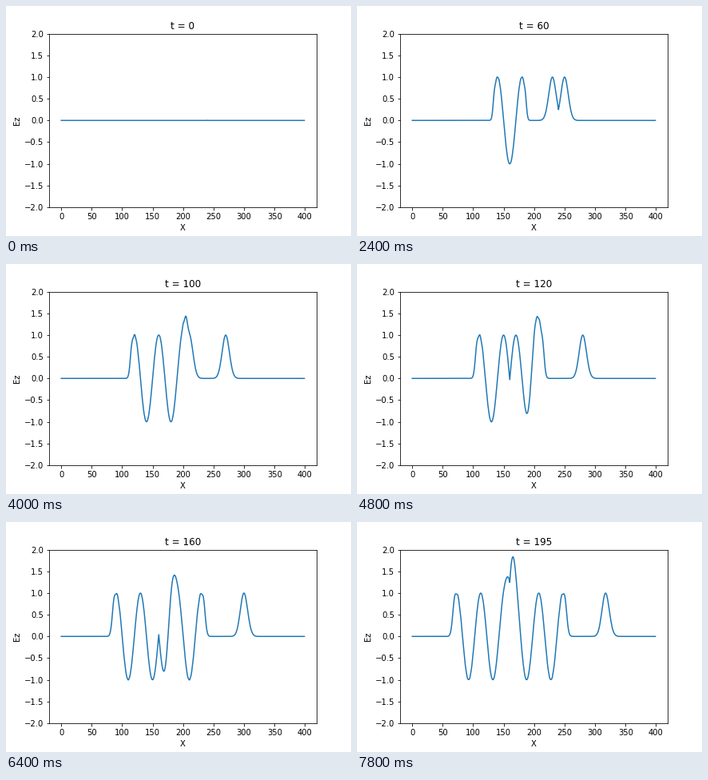
A matplotlib script that plays this animation: 432x288 px, repeating every 8000 ms.

```python
import numpy as np
import matplotlib.pyplot as plt
from matplotlib.animation import FuncAnimation

CELLS = 400
STEP = 5          # time steps per frame
FRAMES = 40
COURANT = 0.5
OMEGA = 2 * np.pi / 80 * 1.003


def sine(t):
    return np.sin(OMEGA * t)


def pulse(t):
    return np.exp(-0.5 * ((t - 40) / 12) ** 2)


def simulate(source, pos):
    """1D FDTD field driven by a hard source, sampled once per frame."""
    ez, hy = np.zeros(CELLS), np.zeros(CELLS)
    fields = []
    for t in range(STEP * FRAMES):
        ez[1:] += COURANT * (hy[:-1] - hy[1:])
        ez[pos] = source(t)
        hy[:-1] += COURANT * (ez[:-1] - ez[1:])
        if t % STEP == 0:
            fields.append(ez.copy())
    return np.array(fields)


# The waves pass through each other freely, so the two runs simply add up.
field = simulate(sine, 160) + simulate(pulse, 240)

fig, ax = plt.subplots(figsize=(6, 4), dpi=72, facecolor="white")
fig.subplots_adjust(left=0.125, right=0.9, bottom=0.125, top=0.88)
line, = ax.plot(field[0], color="#1f77b4", lw=1.5)
ax.set_ylim(-2, 2)
ax.set_xlabel("X")
ax.set_ylabel("Ez")
title = ax.set_title("t = 0")


def draw(i):
    line.set_ydata(field[i])
    title.set_text(f"t = {i * STEP}")
    return line, title


anim = FuncAnimation(fig, draw, frames=FRAMES, interval=200,
                     repeat=True, repeat_delay=0)
plt.show()
```
